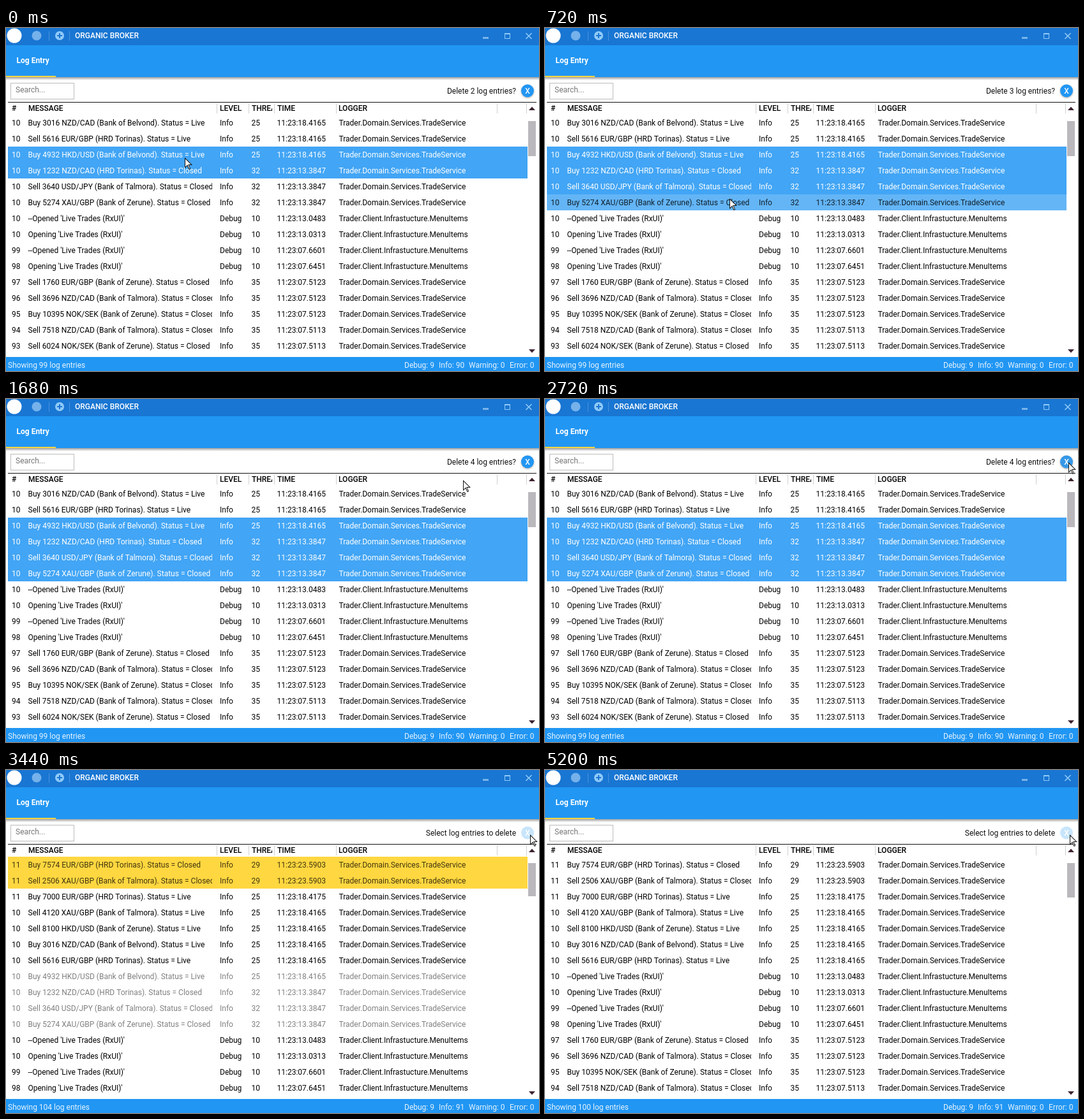
Animation, 835 px wide and 538 px high, one loop 5440 ms. Source, as an HTML page with a canvas:

```html
<!DOCTYPE html>
<html lang="en">
<head>
<meta charset="utf-8">
<title>Log Entry</title>
<style>
  html, body { margin: 0; width: 100%; height: 100%; overflow: hidden; background: #fff; }
  canvas { display: block; }
</style>
</head>
<body>
<canvas id="stage" width="835" height="538"></canvas>
<script>
const ctx = document.getElementById('stage').getContext('2d');
const LOOP = 5440, STEP = 80;
const CLICK_THIRD = 560, CLICK_FOURTH = 1040, DELETE = 2960, REMOVED = 3920, SETTLED = 5200;
const ROW_TOP = 136, ROW_H = 25, ROWS = 15;
const BLUE = '#2196f3', PALE = '#90caf9';

const bankNames = { E: 'Bank of Belvond', A: 'Bank of Talmora', U: 'Bank of Zerune', P: 'HRD Torinas' };

function trade(id, deal, bank, status, thread, time) {
  return { id, text: `${deal} (${bankNames[bank]}). Status = ${status}`, level: 'Info', thread,
    time: '11:23:' + time, logger: 'Trader.Domain.Services.TradeService' };
}
function menu(id, text, time) {
  return { id, text: text + " 'Live Trades (RxUI)'", level: 'Debug', thread: 10,
    time: '11:23:' + time, logger: 'Trader.Client.Infrastucture.MenuItems' };
}

const added = [
  trade(11, 'Buy 7574 EUR/GBP', 'P', 'Closed', 29, '23.5903'),
  trade(11, 'Sell 2506 XAU/GBP', 'A', 'Closed', 29, '23.5903'),
  trade(11, 'Buy 7000 EUR/GBP', 'P', 'Live', 25, '18.4175'),
  trade(10, 'Sell 4120 XAU/GBP', 'A', 'Live', 25, '18.4165'),
  trade(10, 'Sell 8100 HKD/USD', 'U', 'Live', 25, '18.4165')
];
const entries = [
  trade(10, 'Buy 3016 NZD/CAD', 'E', 'Live', 25, '18.4165'),
  trade(10, 'Sell 5616 EUR/GBP', 'P', 'Live', 25, '18.4165'),
  trade(10, 'Buy 4932 HKD/USD', 'E', 'Live', 25, '18.4165'),
  trade(10, 'Buy 1232 NZD/CAD', 'P', 'Closed', 32, '13.3847'),
  trade(10, 'Sell 3640 USD/JPY', 'A', 'Closed', 32, '13.3847'),
  trade(10, 'Buy 5274 XAU/GBP', 'U', 'Closed', 32, '13.3847'),
  menu(10, '--Opened', '13.0483'),
  menu(10, 'Opening', '13.0313'),
  menu(99, '--Opened', '07.6601'),
  menu(98, 'Opening', '07.6451'),
  trade(97, 'Sell 1760 EUR/GBP', 'U', 'Closed', 35, '07.5123'),
  trade(96, 'Sell 3696 NZD/CAD', 'A', 'Closed', 35, '07.5123'),
  trade(95, 'Buy 10395 NOK/SEK', 'U', 'Closed', 35, '07.5123'),
  trade(94, 'Sell 7518 NZD/CAD', 'A', 'Closed', 35, '07.5113'),
  trade(93, 'Sell 6024 NOK/SEK', 'U', 'Closed', 35, '07.5113')
];
const doomed = entries.slice(2, 6);

// Pointer path: time, x, y
const path = [
  [0, 280, 203], [80, 281, 203], [160, 281, 203], [720, 289, 267], [880, 289, 275],
  [960, 289, 275], [1040, 289, 276], [1120, 289, 276], [1680, 716, 127], [2240, 818, 100],
  [2320, 823, 102], [2400, 823, 102], [2720, 820, 99], [2880, 820, 99], [3440, 821, 101],
  [3920, 822, 101], [LOOP, 822, 101]
];

function pointerAt(t) {
  const i = path.findIndex(p => p[0] > t);
  const [t0, x0, y0] = path[i - 1], [t1, x1, y1] = path[i];
  const k = (t - t0) / (t1 - t0);
  return { x: Math.round(x0 + (x1 - x0) * k), y: Math.round(y0 + (y1 - y0) * k) };
}

function rect(x, y, w, h, color) {
  ctx.fillStyle = color;
  ctx.fillRect(x, y, w, h);
}
function disc(x, y, r, color) {
  ctx.fillStyle = color;
  ctx.beginPath();
  ctx.arc(x, y, r, 0, Math.PI * 2);
  ctx.fill();
}
function poly(points, color) {
  ctx.fillStyle = color;
  ctx.beginPath();
  points.forEach(([x, y]) => ctx.lineTo(x, y));
  ctx.closePath();
  ctx.fill();
}
function label(s, x, y, color, weight = 400, align = 'left') {
  ctx.font = `${weight} 12px Roboto, sans-serif`;
  ctx.textAlign = align;
  ctx.fillStyle = color;
  ctx.fillText(s, x, y);
}
function clipped(s, x, y, right, color, weight) {
  ctx.save();
  ctx.beginPath();
  ctx.rect(x - 2, y - 14, right - x + 2, 20);
  ctx.clip();
  label(s, x, y, color, weight);
  ctx.restore();
}

function drawTitle() {
  rect(0, 0, 835, 27, '#1976d2');
  disc(13, 12, 11.5, '#fff');
  disc(48, 12, 7.5, '#75b1ea');
  rect(67, 5, 1, 15, '#4b94dc');
  rect(99, 5, 1, 15, '#4b94dc');
  disc(84, 12, 7, PALE);
  rect(80, 11, 8, 2, '#1976d2');
  rect(83, 8, 2, 8, '#1976d2');
  label('ORGANIC BROKER', 108, 16, '#fff', 500);
  rect(747, 14, 9, 3, '#79b4eb');
  ctx.strokeStyle = PALE;
  ctx.lineWidth = 1;
  ctx.strokeRect(781.5, 8.5, 8, 8);
  rect(781, 8, 9, 2, PALE);
  ctx.lineWidth = 1.6;
  ctx.beginPath();
  ctx.moveTo(814.5, 8); ctx.lineTo(823.5, 17);
  ctx.moveTo(823.5, 8); ctx.lineTo(814.5, 17);
  ctx.stroke();
}

function drawTabs() {
  const shade = ctx.createLinearGradient(0, 77, 0, 82);
  shade.addColorStop(0, 'rgba(0,0,0,.38)');
  shade.addColorStop(1, 'rgba(0,0,0,0)');
  rect(0, 77, 835, 5, shade);
  rect(0, 27, 835, 50, BLUE);
  rect(0, 75, 78, 2, '#ffd740');
  label('Log Entry', 16.5, 55, '#fff', 700);
}

function drawTools(t, pointer) {
  ctx.strokeStyle = '#bcbcbc';
  ctx.lineWidth = 1;
  ctx.strokeRect(7.5, 86.5, 99, 25);
  label('Search...', 15, 101, '#777');

  const active = t < DELETE;
  const count = t < CLICK_THIRD ? 2 : t < CLICK_FOURTH ? 3 : 4;
  const prompt = active ? `Delete ${count} log entries?` : 'Select log entries to delete';
  label(prompt, 799, 103, '#111', 400, 'right');

  const over = Math.hypot(pointer.x - 817, pointer.y - 99) < 10;
  ctx.save();
  if (active) {
    ctx.shadowColor = 'rgba(0,0,0,.35)';
    ctx.shadowBlur = 3;
    ctx.shadowOffsetY = 1;
  }
  disc(817, 98.5, 10, !active ? '#c8e5fb' : over ? '#3598e8' : BLUE);
  ctx.restore();
  label('X', 817, 103, '#fff', 500, 'center');
}

function drawHeader() {
  rect(3, 116, 828, 1, '#111');
  for (const x of [330, 380, 420, 517, 769, 815]) rect(x, 118, 1, 16, '#d0d0d0');
  const heads = [['#', 9, 28], ['MESSAGE', 35, 328], ['LEVEL', 335, 378],
    ['THREAD', 385, 417], ['TIME', 425, 515], ['LOGGER', 521, 767]];
  for (const [s, x, right] of heads) clipped(s, x, 130, right, '#000', 500);
}

function rowStyle(row, t, hovered) {
  if (t >= DELETE) {
    const fresh = t < SETTLED && added.indexOf(row) >= 0 && added.indexOf(row) < 2;
    return fresh ? ['#ffd740', '#40350f'] : [null, '#000'];
  }
  const count = t < CLICK_THIRD ? 2 : t < CLICK_FOURTH ? 3 : 4;
  const pick = doomed.indexOf(row);
  if (pick >= 0 && pick < count) return ['#42a5f5', '#fff'];
  return hovered ? ['#64b5f6', '#10202c'] : [null, '#000'];
}

function drawRows(t, pointer) {
  let list = t < DELETE ? entries : added.concat(entries);
  if (t >= REMOVED) list = list.filter(row => !doomed.includes(row));
  const hoverRow = pointer.x < 817 ? Math.floor((pointer.y - ROW_TOP) / ROW_H) : -1;
  list.slice(0, ROWS).forEach((row, i) => {
    const top = ROW_TOP + i * ROW_H, base = top + 17;
    const [back, ink] = rowStyle(row, t, i === hoverRow);
    if (back) rect(3, top, 814, ROW_H, back);
    if (t >= DELETE && doomed.includes(row)) {
      ctx.globalAlpha = 1 - (t - DELETE) / (REMOVED - DELETE);
    }
    label(row.id, 9, base, ink);
    clipped(row.text, 34.5, base, 323, ink);
    label(row.level, 335, base, ink);
    label(row.thread, 384.5, base, ink);
    label(row.time, 424.5, base, ink);
    label(row.logger, 521.5, base, ink);
    ctx.globalAlpha = 1;
  });
}

function drawScroll(t) {
  const bottom = t < DELETE ? 201 : t < REMOVED ? 198 : 200;
  poly([[819, 129], [824, 123.5], [829, 129]], '#3c2230');
  poly([[819, 504], [829, 504], [824, 509.5]], '#3c2230');
  rect(818, 146, 12, bottom - 146, '#bab8bc');
}

function drawStatus(t) {
  const total = t < DELETE ? 99 : t < REMOVED ? 104 : 100;
  const ink = '#e6f3fe';
  rect(0, 516, 835, 22, BLUE);
  label(`Showing ${total} log entries`, 3, 533, ink);
  label('Debug: 9', 624, 533, ink);
  label('Info: ' + (t < DELETE ? 90 : 91), 678, 533, ink);
  label('Warning: 0', 725, 533, ink);
  label('Error: 0', 789, 533, ink);
}

function drawPointer({ x, y }) {
  ctx.save();
  ctx.translate(x, y);
  const arrow = [[0, 0], [0, 17], [4, 13.3], [6.6, 19], [9.2, 18], [6.7, 12], [12, 12]];
  poly(arrow, '#111');
  poly([[1, 2.4], [1, 14.7], [4.3, 11.6], [7.1, 17.8], [8, 17.4], [5.3, 11], [9.6, 11]], '#fff');
  ctx.restore();
}

function draw(now) {
  const t = Math.floor((now % LOOP) / STEP) * STEP;
  const pointer = pointerAt(t);
  rect(0, 0, 835, 538, '#fff');
  drawTitle();
  drawTabs();
  drawTools(t, pointer);
  drawHeader();
  drawRows(t, pointer);
  drawScroll(t);
  drawStatus(t);
  drawPointer(pointer);
}

const start = performance.now();
function tick() {
  draw(performance.now() - start);
  requestAnimationFrame(tick);
}
tick();
</script>
</body>
</html>
```
